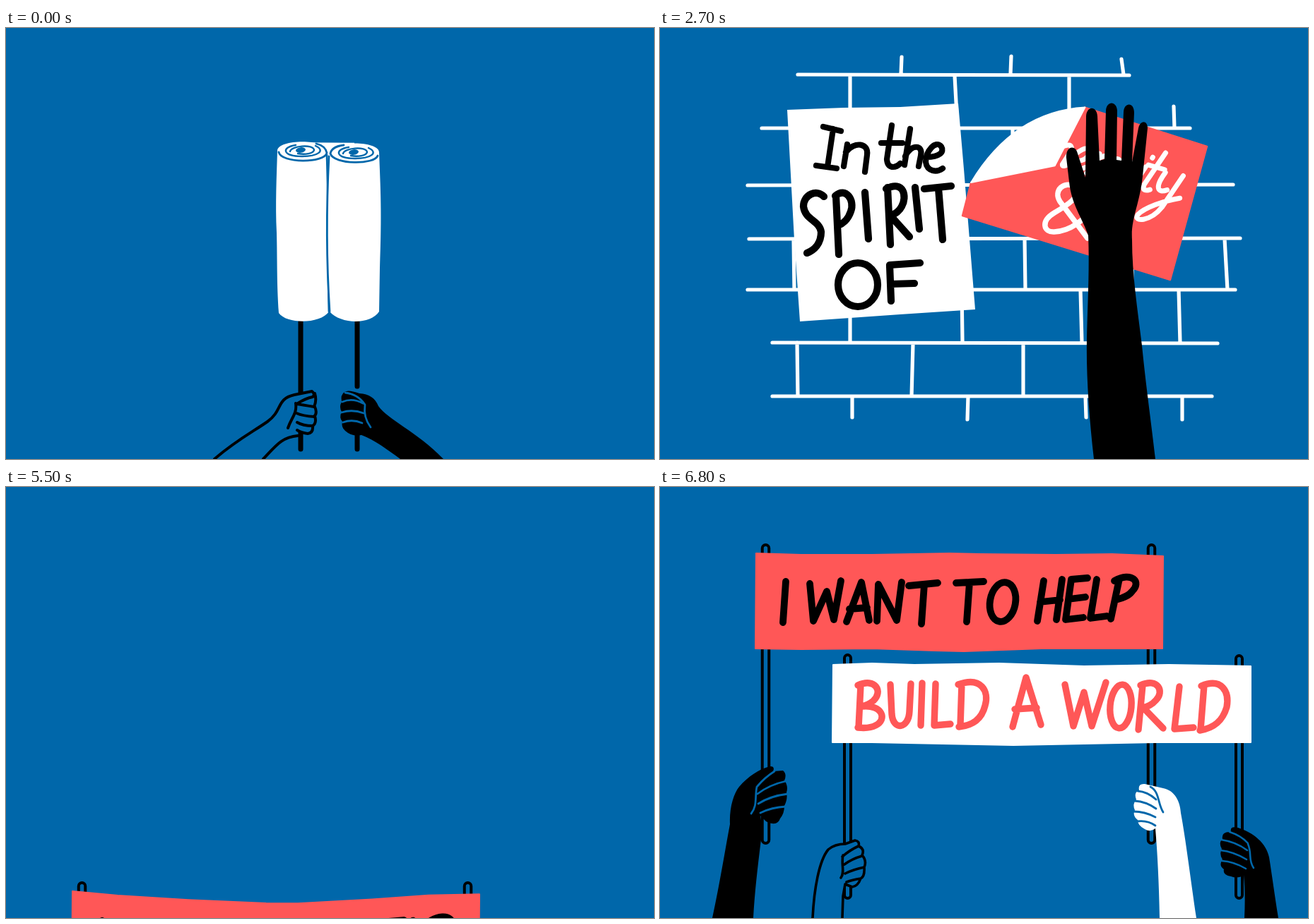
An HTML page with a canvas that plays this animation: 917 px wide and 611 px high, repeating every 8 s.

```html
<!DOCTYPE html>
<html lang="en">
<head>
<meta charset="utf-8">
<title>Working with others</title>
<style>
html, body { margin: 0; width: 100%; height: 100%; overflow: hidden; background: #0067aa; }
canvas { display: block; width: 917px; height: 611px; }
</style>
</head>
<body>
<canvas id="stage" width="917" height="611" role="img" aria-label="Working with others, in the spirit of generosity &amp; mutual respect, I want to help build a world"></canvas>
<script>
const ctx = document.getElementById('stage').getContext('2d');
const BLUE = '#0067aa', RED = '#ff5757', WHITE = '#fff', BLACK = '#000';
const LOOP = 8000, STEP = 100;

const cache = {};
const shape = d => d instanceof Path2D ? d : cache[d] || (cache[d] = new Path2D(d));
function fill(d, color) { ctx.fillStyle = color; ctx.fill(shape(d)); }
function line(d, color, w) { ctx.strokeStyle = color; ctx.lineWidth = w; ctx.stroke(shape(d)); }
function at(x, y, fn) { ctx.save(); ctx.translate(x, y); fn(); ctx.restore(); }
function within(d, fn) { ctx.save(); ctx.clip(shape(d)); fn(); ctx.restore(); }
function moved(d, matrix) { const p = new Path2D(); p.addPath(new Path2D(d), matrix); return p; }
const poly = pts => 'M' + pts.map(p => p.join(' ')).join('L') + 'Z';
const mix = (a, b, k) => [a[0] + (b[0] - a[0]) * k, a[1] + (b[1] - a[1]) * k];

function oval(x, y, rx, ry, deg = 0) {
  const a = deg * Math.PI / 180, c = rx * Math.cos(a), s = rx * Math.sin(a);
  return `M${x - c} ${y - s}A${rx} ${ry} ${deg} 1 1 ${x + c} ${y + s}A${rx} ${ry} ${deg} 1 1 ${x - c} ${y - s}Z`;
}

// Value of a step table at time t; the ends hold.
function pick(table, from, t) {
  const i = Math.round((t - from) / STEP);
  return table[Math.max(0, Math.min(table.length - 1, i))];
}

/* ---- Scroll ---- */
const PAPER = 'M214 167L280 167L340 166L400 162L520 163L600 163L690 160L697 165L715 165L715 399L680 399L640 401L600 403L500 402L400 402L340 403L214 403Z';
const WORKING = [
  'M315 216L325 260L340 226L350 258L361 212', oval(385, 236, 12, 22, 12),
  'M418 216L412 263M416 217C432 207 447 216 440 228C436 238 424 241 418 243L441 263',
  'M457 214L452 266M479 213L457 241L479 266', 'M496 213L491 264',
  'M508 264L514 212L540 261L553 212', 'M596 213C576 204 562 235 567 251C572 270 592 264 597 243M580 243L600 242'
].join('');
const WITH = 'M276 302L280 352L298 312L305 349L317 301M329 304L325 350M338 303L374 299M354 303L349 350'
  + 'M384 300L377 353M409 296L401 352M381 328L405 324';
const OTHERS = [
  oval(450, 325, 14, 27, 14), 'M468 305L500 299M486 303L478 349', 'M512 298L499 345M533 296L522 348M505 325L528 321',
  'M578 291L554 296L538 346L565 339M547 320L571 315',
  'M590 292L574 346M585 295C607 284 617 300 605 311C598 318 590 320 584 321L605 345',
  'M651 297C641 286 622 293 625 307C630 318 654 320 650 333C645 346 627 346 620 342', 'M647 351L651 350L645 362'
].join('');

function swirl(x, y) {
  at(x, y, () => {
    line('M21 -6C36 1 24 9 2 9C-26 9 -28 -4 -7 -7M-15 2C-14 -6 18 -9 19 0C18 5 6 7 -4 5', BLUE, 2.4);
    fill(oval(0, 0, 7, 3.8, -8), BLUE);
  });
}
function leftRoll() {
  fill('M179 174C179 157 250 157 250 174L251 300L252 402C240 420 192 420 181 404C178 360 179 330 178 290C176 250 178 210 179 174Z', WHITE);
  line('M181 176C184 192 246 192 249 177Q247 167 234 164M249 180C252 260 250 330 252 402', BLUE, 2.8);
  swirl(212, 173);
}
function rightRoll() {
  fill('M679 178C680 159 749 159 750 176C752 230 754 260 751 340L750 402C738 421 695 420 680 402C676 340 675 260 679 178Z', WHITE);
  line('M700 166Q683 168 681 178C686 194 744 194 748 181M679 182C675 260 676 340 680 402', BLUE, 2.8);
  swirl(714, 176);
}
function leftHolder() {
  line('M417 416L417 597', BLACK, 7);
  fill('M408 521L434 515Q440 525 437 535Q441 548 436 562Q434 574 426 575L413 572L404 560L409 540Z', BLUE);
  line('M295 611C325 585 350 572 370 558C392 542 382 526 408 520L433 515Q438 519 434 523Q424 525 413 532'
    + 'M437 518Q440 528 436 537Q418 534 411 533M437 537Q441 546 436 551Q420 550 411 546M437 550Q440 560 434 564Q420 564 412 559'
    + 'M434 564Q435 574 427 575Q418 574 412 570M410 532C412 547 404 552 399 567M364 611C382 592 390 580 413 578', BLACK, 4);
}
function rightHolder() {
  line('M497 416L497 508M497 570L497 597', BLACK, 7);
  fill('M479 516Q484 512 500 518C514 519 522 524 527 536C540 555 580 571 619 611L558 611C540 598 522 584 503 577Q490 580 480 571Q474 566 476 558Q471 552 475 544Q471 537 475 530Q473 520 479 516Z', BLACK);
  line('M476 530Q490 524 505 532M475 545Q490 540 506 546M477 559Q490 554 504 560M480 517Q498 519 508 534C506 548 510 558 516 566', BLUE, 2.8);
}
function scroll(t) {
  const k = Math.min(1, t / 800), p = k * k * (3 - 2 * k);
  const lx = 205 * (1 - p), rx = -222 * (1 - p);
  at(-205 * p, 0, leftHolder);
  at(222 * p, 0, rightHolder);
  within(poly([[214 + lx, 0], [715 + rx, 0], [715 + rx, 611], [214 + lx, 611]]), () => {
    fill(PAPER, WHITE);
    line(WORKING, BLACK, 10);
    line(WITH, BLACK, 10);
    line(OTHERS, BLACK, 10);
  });
  at(lx, 0, leftRoll);
  at(rx, 0, rightRoll);
}

/* ---- Wall ---- */
const WALL = 'M195 66L664 67M144 142L750 142M124 223L811 222M126 299L821 298M124 371L814 371M159 446L789 447M159 522L781 522'
  + 'M342 41L341 65M497 40L496 65M653 44L656 66M269 68L269 142M417 68L421 142M579 68L579 142M727 111L728 142'
  + 'M499 142L499 222M654 142L654 222M583 222L583 299M728 222L728 299'
  + 'M189 299L190 371M516 299L517 371M668 299L668 371M799 299L803 371'
  + 'M269 371L269 444M427 371L428 444M595 371L597 446M734 371L736 446'
  + 'M194 446L195 522M358 448L356 522M514 448L514 520M668 447L668 522'
  + 'M272 522L272 552M436 522L435 555M602 522L603 552M739 522L739 555';
const NOTE = 'M180 116L260 113L340 112L422 107L430 200L446 399L340 406L198 416L190 300Z';
const IN_THE = 'M231 140L256 146M245 143L237 197M221 195L250 199M265 165L260 196M263 176C275 160 296 163 293 180L290 204'
  + 'M328 138L321 186C322 200 333 199 340 192M313 163L343 163M354 143L346 194M347 182C355 164 373 165 369 181L366 196'
  + 'M377 183C395 183 403 176 398 168C390 158 376 175 376 190C378 204 392 205 400 199';
const SPIRIT = 'M232 239C222 228 203 236 203 253C205 272 226 273 228 289C228 306 218 315 208 319'
  + 'M249 238L253 321M248 238C263 225 276 244 270 260C266 272 258 278 252 280M290 233L295 299'
  + 'M322 226L326 307M320 228C345 215 350 239 342 253C338 261 332 264 326 266L353 296M361 226L367 285M374 228L412 224M394 227L400 300';
const OF = oval(280, 364, 28, 31) + 'M368 333L325 336L327 387M327 363L360 362';

const GEN = moved(oval(-1, -16, 12, 14, -10)
  + 'M12 -28L12 8C10 30 -10 35 -14 26C-14 14 12 8 28 -1M28 -10C44 -10 49 -18 45 -26C39 -32 27 -22 28 -10C30 2 42 2 52 -6'
  + 'M58 -26L56 0M57 -12C62 -28 76 -30 76 -18L75 -2Q77 2 84 -6M84 -10C99 -10 104 -18 100 -26C94 -32 82 -22 84 -10C86 2 98 2 106 -6'
  + 'M114 -26L112 0M113 -12C116 -24 124 -28 130 -24' + oval(140, -12, 9, 14, 8)
  + 'M173 -24C165 -32 155 -24 161 -16C169 -10 173 0 163 2Q157 3 153 -2M182 -26L180 -3Q182 3 188 -2M184 -39L184 -38'
  + 'M197 -48L193 -6Q195 4 204 -2M184 -29L208 -29M211 -26C208 -6 216 0 226 -7M236 -28L232 14C228 34 206 40 207 30C210 20 230 6 248 -2',
  new DOMMatrix().translate(496, 175).rotate(16).skewX(-14).scale(1, 1.22));
const AMP = 'M605 298L566 246C556 230 572 216 588 225C598 238 575 252 558 262C538 274 543 290 558 289C580 288 602 272 609 256Q604 252 598 256';

const CARD = [[478, 73], [774, 168], [722, 357], [428, 266]];
const NX = .551, NY = .835;
const depth = p => (p[0] - CARD[0][0]) * NX + (p[1] - CARD[0][1]) * NY;

// Part of the card on one side of the fold, and the two fold points.
function split(d, side) {
  const pts = [], cuts = [];
  CARD.forEach((p, i) => {
    const q = CARD[(i + 1) % 4], a = depth(p) - d, b = depth(q) - d;
    if (a * side >= 0) pts.push(p);
    if (a * b < 0) { const c = mix(p, q, a / (a - b)); pts.push(c); cuts.push(c); }
  });
  return { pts, cuts };
}
function card(d) {
  const face = poly(d ? split(d, 1).pts : CARD);
  fill(face, RED);
  line(face, RED, 2.4);
  within(face, () => {
    line(GEN, WHITE, 7);
    line(AMP, WHITE, 7.5);
  });
  if (!d) return;
  const { pts, cuts: [a, b] } = split(d, -1);
  const flap = poly(pts.map(p => { const k = 1.45 * (d - depth(p)); return [p[0] + k * NX, p[1] + k * NY]; }));
  const m = mix(a, b, .45), lift = Math.min(52, d / 2);
  const bulge = `M${a}Q${m[0] - lift * NX} ${m[1] - lift * NY} ${b}Z`;
  for (const part of [flap, bulge]) { fill(part, WHITE); line(part, WHITE, 2); }
}
const PALM = 'M640 900L614 611C607 550 603 490 604 440C605 395 608 340 606 294C598 270 582 250 579 218L575 184C574 167 588 165 591 178L602 212L603 125C604 110 618 110 619 125L622 188L629 186L631 117C632 103 646 103 647 117L646 187L653 188L656 119C657 105 671 105 671 120L668 190L677 142C680 130 690 131 690 142L683 210C679 250 666 270 668 300C668 350 676 400 682 450C688 510 694 550 701 611L735 900Z';
const CARD_FOLD = [265, 235, 190, 145, 101, 55, 15, 0, 0];
const CARD_HAND = [[45, 190], [42, 135], [30, 85], [15, 38], [0, 0], [-32, -4], [-20, 85], [-5, 280], [0, 520]];

const SHEET = [[475, 335], [783, 292], [808, 503], [500, 546]];
const RESPECT = 'M509 445L518 504M507 444C530 434 549 448 538 460C532 469 522 473 514 475L551 498'
  + 'M584 436L561 440L570 496L588 492M565 468L583 465M622 433C610 426 596 438 604 450C612 460 630 462 626 475C622 487 606 490 598 486'
  + 'M642 430L649 486M639 430C660 420 674 436 666 448C662 456 654 459 646 460M703 420L681 425L689 481L709 477M685 453L703 449'
  + 'M738 418C722 410 710 430 716 448C720 468 732 467 742 459M746 409L787 403M766 407L769 461';
const MUTUAL = 'M507 422L499 366L523 396L540 360L550 416M563 356L570 395C573 416 598 412 597 393L590 352M604 352L646 345M625 349L633 406'
  + 'M655 342L662 382C665 402 690 398 689 380L682 338M697 394L712 334L737 389M702 372L728 368M748 330L756 386L785 381';
const CURL = 'M482 422C484 408 492 397 505 398C520 400 530 425 540 442';
const FLAP = 'M482 422C488 394 508 390 530 386C620 366 740 354 792 340Q803 338 808 346C818 362 822 378 826 393C730 416 640 432 540 442C530 425 520 400 505 398C492 397 484 408 482 422Z';
const PUSH = 'M690 900L664 611C662 570 658 530 646 508C628 496 617 467 607 436C606 424 625 424 628 434L638 462L634 420L636 345C637 333 650 333 651 345L655 410L658 330C660 317 672 317 674 330L675 410L682 335C684 323 696 324 696 337L694 410L704 362C707 350 717 352 717 362L715 420C715 460 711 500 713 525C718 555 728 580 737 611L800 900Z';
const SHEET_FOLD = [110, 96, 76, 52, 26, 0, -35, -60, null];
const PUSH_MOVE = [[15, 130], [14, 108], [12, 84], [8, 56], [4, 28], [0, 0], [-6, -10], [-11, -18], [-15, -24],
  [-12, 10], [-8, 85], [-4, 180], [0, 265], [0, 400]];

function flapAt(dy, fn) {
  const s = Math.max(.3, Math.min(1.35, 1 + dy / 85));
  ctx.save();
  ctx.translate(482 + dy * .12, 405 + dy);
  ctx.rotate(-.14); ctx.scale(1, s); ctx.rotate(.14);
  ctx.translate(-482, -405);
  fn();
  ctx.restore();
}
function sheet(t) {
  const dy = pick(SHEET_FOLD, 3200, t), [hx, hy] = pick(PUSH_MOVE, 3200, t);
  const [tl, tr, br, bl] = SHEET, flat = dy === null;
  const k = flat ? 0 : (83 + dy) / 211, l = mix(tl, bl, k), r = mix(tr, br, k);
  const face = new Path2D(poly([l, r, br, bl]));
  if (!flat) face.addPath(new Path2D(CURL + 'Z'), new DOMMatrix().translate(dy * .12, dy));
  fill(face, WHITE);
  within(face, () => { line(MUTUAL, RED, 10); line(RESPECT, RED, 10); });
  const hand = () => at(hx, hy, () => fill(PUSH, BLACK));
  if (flat) return hand();
  within(poly([l, r, [917, 611], [400, 611]]), hand);
  flapAt(dy, () => {
    fill(FLAP, WHITE);
    line(CURL, BLACK, 4);
    line('M540 442C640 432 730 416 826 393', BLACK, 2.4);
  });
}
function wall(t) {
  line(WALL, WHITE, 5.2);
  fill(NOTE, WHITE);
  line(IN_THE, BLACK, 8.2);
  line(SPIRIT, BLACK, 10.2);
  line(OF, BLACK, 10.2);
  if (t < 2300) return;
  card(pick(CARD_FOLD, 2300, t));
  if (t < 3100) at(...pick(CARD_HAND, 2300, t), () => fill(PALM, BLACK));
  if (t >= 3200) sheet(t);
}

/* ---- Banners ---- */
const HELP = [
  [176, 'M178 134L174 192'], [235, 'M212 137L217 190L236 148L246 188L256 133'], [281, 'M264 191L285 135L296 189M268 173L293 171'],
  [325, 'M307 190L309 138L335 189L342 135'], [372, 'M352 140L393 136M374 138L370 194'], [437, 'M419 136L458 134M438 135L434 191'],
  [485, oval(485, 163, 18, 28, 10)], [552, 'M543 133L534 190M569 131L561 188M538 163L566 160'],
  [590, 'M605 129L582 131L574 188L599 185M578 159L602 156'], [620, 'M618 131L609 186L632 183'],
  [655, 'M650 130L638 187M643 133C668 119 682 135 668 148C662 156 652 158 645 160']
];
const BUILD = 'M284 281L281 341M280 281C305 270 316 290 302 303C296 308 290 310 286 311C315 308 322 330 305 338C298 342 290 342 280 341'
  + 'M326 280L328 322C330 346 352 343 353 318L355 279M371 278L369 338M390 279L388 338L411 336'
  + 'M427 279L425 338M422 280C455 268 466 290 460 310C455 330 442 338 423 340M499 340L518 270L539 337M502 315L533 313';
const WORLD = 'M573 280L585 339L600 291L611 339L631 277' + oval(652, 311, 15, 31, 5)
  + 'M683 281L677 344M680 281C705 270 714 290 702 302C696 309 690 311 684 313L712 342M735 283L728 343L755 341'
  + 'M770 281L765 344M766 282C795 270 806 290 802 312C796 332 784 342 764 345';
const TOP = [[136, 94], [200, 96], [300, 96], [410, 94], [455, 95], [560, 96], [640, 95], [712, 98]];
const LOW = [[711, 229], [640, 229], [540, 229], [430, 233], [390, 232], [300, 229], [200, 230], [135, 229]];

// Red banner: x, y, sag for each step.
const RISE = [[-42, 479, 1], [5, 330, 1], [48, 185, 1], [62, 70, 1], [28, 10, 1], [0, 0, 1], [0, 0, .6], [0, 0, .25], [0, 0, 0]];
const RISE2 = [280, 85, -58, -25, 0];

function pole(x, top, bottom, w) {
  const p = new Path2D();
  p.roundRect(x - w / 2, top, w, bottom - top, w / 2);
  fill(p, BLUE);
  line(p, BLACK, 4);
}
function redBanner([x, y, s]) {
  const sag = px => s * Math.max(0, 1 - Math.abs(px - 425) / 290);
  const droop = ([px, py]) => [px, py + 18 * sag(px)];
  at(x, y, () => {
    pole(149.5, 82, 505, 9.5);
    pole(695.5, 82, 505, 9.5);
    const cloth = poly([...TOP, ...LOW].map(droop));
    fill(cloth, RED);
    line(cloth, RED, 2);
    HELP.forEach(([px, d]) => at(0, 14 * sag(px), () => line(d, BLACK, 9.8)));
    fill('M40 800L74 611C85 560 92 515 99 478C98 455 104 435 112 425C125 410 140 400 156 396Q163 396 160 403L174 402Q180 407 176 416Q182 424 179 433Q181 442 176 452Q176 463 170 470Q166 482 150 474L142 466Q146 490 143 500C138 540 134 575 132 611L122 800Z', BLACK);
    line('M162 403Q148 412 138 424M178 417Q155 422 138 435M181 435Q156 438 139 449M178 453Q158 454 142 462M137 425C134 440 138 452 129 463', BLUE, 2.8);
    fill('M710 800L707 611C706 560 704 520 701 484Q694 490 686 485Q676 480 676 472Q668 466 672 458Q668 450 674 443Q670 433 678 430Q676 420 686 421L712 427C728 430 736 445 737 462C744 500 750 550 759 611L786 800Z', WHITE);
    line('M676 431Q690 432 702 443M672 445Q688 446 702 456M670 460Q686 460 701 468M675 474Q690 472 701 480M694 425C707 432 704 448 712 461', BLUE, 2.8);
  });
}
function whiteBanner(y) {
  at(0, y, () => {
    pole(265.5, 238, 583, 9);
    pole(819.5, 239, 583, 9);
    const cloth = 'M245 252L300 250L360 252L480 250L600 254L720 252L836 254L836 362L700 362L600 364L500 366L400 364L300 362L244 362Z';
    fill(cloth, WHITE);
    line(cloth, WHITE, 2);
    line(BUILD, RED, 9.4);
    line(WORLD, RED, 9.4);
    const arm = 'M192 800L216 611C218 570 225 530 238 514C245 508 255 506 262 506L276 501Q283 502 281 509Q290 513 286 522Q293 530 289 539Q290 552 284 555Q280 566 272 567L262 563L259 580L258 611L254 800';
    fill(arm, BLUE);
    line(arm + 'M281 509Q268 515 258 524M286 523Q272 527 261 535M289 539Q274 542 262 548M284 555Q272 557 264 560M259 522C256 535 262 546 256 554', BLACK, 3.6);
    fill('M824 800L827 611C828 590 828 570 826 550Q818 556 808 552Q796 550 798 542Q790 536 796 528Q791 520 795 513Q790 504 796 499Q794 488 808 489Q806 480 818 483C840 490 858 505 862 525C866 550 870 580 875 611L900 800Z', BLACK);
    line('M806 489Q822 494 832 505M794 500Q815 503 831 515M793 515Q812 517 830 528M795 530Q812 531 829 541M832 506C838 520 832 528 840 540', BLUE, 2.6);
  });
}

function draw(t) {
  ctx.lineCap = ctx.lineJoin = 'round';
  ctx.fillStyle = BLUE;
  ctx.fillRect(0, 0, 917, 611);
  if (t < 1800) scroll(t);
  else if (t < 5500) wall(t);
  else {
    redBanner(pick(RISE, 5500, t));
    if (t >= 6400) whiteBanner(pick(RISE2, 6400, t));
  }
}
function tick() {
  draw(Math.floor(performance.now() % LOOP / STEP) * STEP);
  requestAnimationFrame(tick);
}
tick();
</script>
</body>
</html>
```
